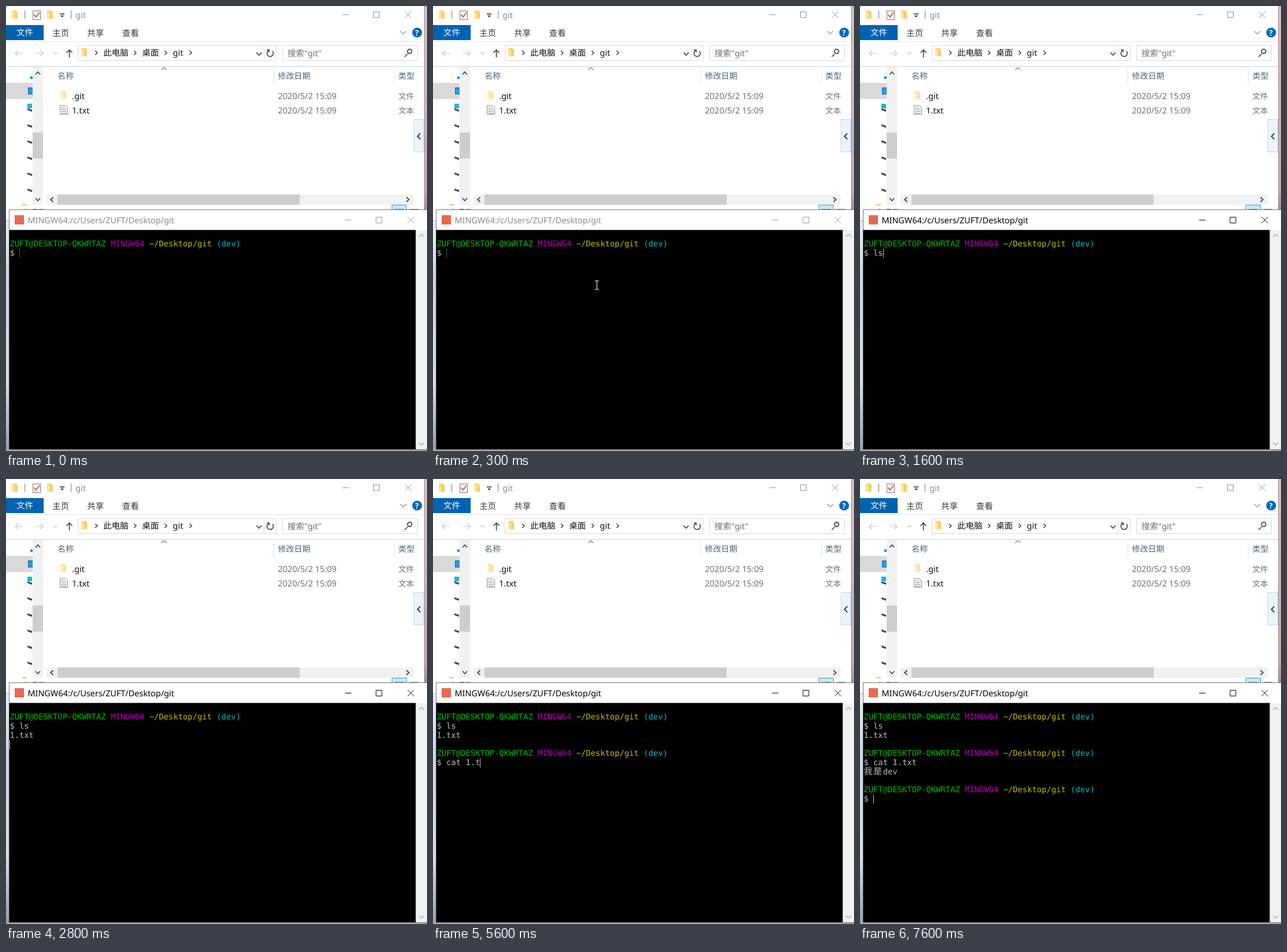
These frames come from a looping animation (727 by 770 pixels, 8000 ms). An HTML page:

```html
<!DOCTYPE html>
<html lang="zh">
<head>
<meta charset="utf-8">
<title>git</title>
<style>
  html, body { margin: 0; width: 100%; height: 100%; overflow: hidden; background: #fff; }
  svg { display: block; width: 727px; height: 770px; }
  text { font: 14.5px "Noto Sans", "Noto Sans CJK SC", sans-serif; text-rendering: geometricPrecision; white-space: pre; }
  rect { shape-rendering: crispEdges; }
  .line { fill: none; stroke: #222; stroke-width: 1.2; }
  .thick { stroke-width: 1.7; stroke: #444; }
  .pale { stroke: #c4c4c4; }
  .grey { stroke: #8a8a8a; }
  .head { font-size: 14px; fill: #4c607a; }
  .info { fill: #6d6d6d; }
  .box { fill: #fff; stroke: #d9d9d9; }
  #caption { font-size: 14.4px; fill: #888; }
  #controls { stroke: #999; }
  .active #caption { fill: #000; }
  .active #controls { stroke: #000; }
  #screen text { font: 13.8px "DejaVu Sans Mono", "Noto Sans CJK SC", monospace; fill: #bfbfbf; }
  #screen .wide { font-size: 15px; }
</style>
</head>
<body>
<svg viewBox="0 0 727 770">
  <defs>
    <linearGradient id="wall" x2="0" y2="1">
      <stop offset="0" stop-color="#d9bfc6"/><stop offset=".9" stop-color="#c9a9b2"/><stop offset="1" stop-color="#a98a94"/>
    </linearGradient>
    <linearGradient id="edge" x2="0" y2="1">
      <stop offset="0" stop-color="#e9eff4"/><stop offset=".25" stop-color="#c9d6e0"/>
      <stop offset=".7" stop-color="#d5e0e8"/><stop offset="1" stop-color="#8fa0ae"/>
    </linearGradient>
    <g id="folder"><path d="M0 0h8v2h2v12H0z" fill="#f6cf62"/><path d="M0 1l5 2v12l-5-2z" fill="#ffe394"/></g>
    <path id="up" class="line thick" d="M-4 2.5L0-2 4 2.5"/>
    <path id="right" class="line" d="M-2-3.5L1.8 0-2 3.5"/>
    <path id="buttons" d="M-5 0.5H6M48.5-4.5h10v10h-10zM103-5l11 11M114-5l-11 11" fill="none"/>
    <path id="drive" d="M0 0l8 2.5v3.5L0 3z" fill="#444"/>
  </defs>

  <!-- file explorer -->
  <rect width="727" height="770" fill="#fff"/>
  <rect x="722" width="1" height="353" fill="#9b8e93"/>
  <rect x="723" width="4" height="353" fill="url(#wall)"/>
  <use href="#folder" x="10" y="8"/>
  <path class="line grey" d="M32.5 8v14M112.5 8v14"/>
  <rect x="46.5" y="8.5" width="13" height="15" fill="#fff" stroke="#777"/>
  <path class="line" d="M48.5 15l3.5 4 6-8" style="stroke:#e0562b;stroke-width:2"/>
  <use href="#folder" x="71" y="8"/>
  <path d="M93 13h8v1.5h-8zM94 16.5h6l-3 3z" fill="#222"/>
  <text x="120" y="20.5" fill="#888">git</text>
  <use href="#buttons" x="586" y="14.5" stroke="#8a8a8a"/>

  <rect y="33" width="65" height="26" fill="#0063b1"/>
  <text x="18" y="51" fill="#fff">文件</text>
  <g fill="#333"><text x="80" y="51.5">主页</text><text x="140" y="51.5">共享</text><text x="200.5" y="51.5">查看</text></g>
  <path class="line grey" d="M681 43.5l5 5 5-5"/>
  <circle cx="710" cy="46" r="8.5" fill="#0067c0"/>
  <text x="706.5" y="51" fill="#fff" style="font-weight:bold;font-size:13px">?</text>
  <rect y="61" width="722" height="1" fill="#e4e4e4"/>

  <path class="line pale" d="M29 82H16m5-5l-5 5 5 5M51 82h13m-5-5l5 5-5 5M82 80l3.5 3.5L89 80"/>
  <path class="line thick" d="M109.5 89V76m-5 5l5-5 5 5"/>
  <rect class="box" x="124.5" y="68.5" width="342" height="26"/>
  <rect x="445" y="69" width="1" height="25" fill="#e0e0e0"/>
  <use href="#folder" x="130" y="73"/>
  <use href="#right" x="156" y="81"/><use href="#right" x="223" y="81"/>
  <use href="#right" x="276" y="81"/><use href="#right" x="319" y="81"/>
  <g fill="#111"><text x="168" y="86">此电脑</text><text x="235" y="86">桌面</text><text x="288" y="86">git</text></g>
  <path class="line thick" d="M432.5 80.5l4.5 4.5 4.5-4.5"/>
  <path class="line thick" d="M460 78a5.5 5.5 0 1 1-6-1.2M450.5 76h4v4"/>
  <rect class="box" x="477.5" y="68.5" width="233" height="26"/>
  <text x="486" y="87" class="info">搜索"git"</text>
  <path class="line thick" d="M688.5 88l5-5M693.5 80a3.8 3.8 0 1 1 7 0 3.8 3.8 0 0 1-7 0"/>
  <rect y="104" width="722" height="1" fill="#cfcfcf"/>

  <!-- navigation pane -->
  <circle cx="44" cy="124" r="2.5" fill="#1a8fe3"/>
  <rect y="133" width="46" height="28" fill="#d9d9d9"/>
  <rect x="38.5" y="141.5" width="8" height="11" fill="#1e9df0" stroke="#235a86"/>
  <rect x="37" y="169" width="8" height="8" fill="#20b2e8"/>
  <g id="drives"></g>
  <rect x="28" y="343" width="8" height="2" fill="#e6c65c"/>
  <rect x="46" y="105" width="18" height="239" fill="#f1f1f1"/>
  <rect x="46" y="219" width="18" height="45" fill="#cdcdcd"/>
  <use href="#up" x="55" y="116"/>
  <use href="#up" transform="translate(55 335) rotate(180)"/>

  <!-- file list -->
  <path class="line" d="M268 110.5l4.5-4 4.5 4" style="stroke:#777"/>
  <path class="line" d="M462.5 106v30M670.5 106v30" style="stroke:#e5e5e5"/>
  <text class="head" x="89" y="126">名称</text>
  <text class="head" x="469.5" y="126">修改日期</text>
  <text class="head" x="677.5" y="126">类型</text>
  <use href="#folder" x="94" y="147" opacity=".6"/>
  <path d="M93.5 172.5h9l4 3v12h-13z" fill="#fff" stroke="#888"/>
  <path class="line grey" d="M95.5 176.5h7m-7 3h9m-9 3h9m-9 3h9"/>
  <g fill="#111"><text x="114" y="161">.git</text><text x="114" y="186">1.txt</text></g>
  <g class="info">
    <text x="469.5" y="161">2020/5/2 15:09</text><text x="469.5" y="186">2020/5/2 15:09</text>
    <text x="677.5" y="161" style="font-size:13.6px">文件</text><text x="677.5" y="186" style="font-size:13.6px">文本</text>
  </g>
  <rect x="704.5" y="196.5" width="17" height="56" fill="#e9f5fb" stroke="#b5dcec"/>
  <path class="line" d="M715.5 220.5l-5 5 5 5" style="stroke:#111;stroke-width:1.6"/>
  <rect x="70" y="326" width="634" height="18" fill="#f1f1f1"/>
  <rect x="89" y="326" width="418" height="18" fill="#cdcdcd"/>
  <use href="#up" transform="translate(79 335) rotate(-90)"/>
  <use href="#up" transform="translate(694 335) rotate(90)"/>
  <text x="16" y="362" fill="#223a5c" style="font-size:13.5px">2 个项目</text>
  <rect x="666.5" y="344.5" width="25" height="20" fill="#cce8ff" stroke="#26a0da"/>
  <path class="line grey" d="M671 351.5h16M697 351.5h15"/>

  <!-- terminal window -->
  <rect y="371" width="5" height="399" fill="url(#edge)"/>
  <rect y="371" width="5" height="1" fill="#9aa4ab"/>
  <rect y="767" width="727" height="3" fill="#b5a5aa"/>
  <g id="terminal">
    <rect x="5" y="352" width="722" height="416" fill="#777"/>
    <rect x="6" y="353" width="721" height="35" fill="#fff"/>
    <rect x="15" y="362" width="16" height="16" fill="#e8694f"/>
    <text id="caption" x="37.5" y="376">MINGW64:/c/Users/ZUFT/Desktop/git</text>
    <use id="controls" href="#buttons" x="590.5" y="370"/>
    <rect x="707" y="388" width="20" height="379" fill="#f1f1f1"/>
    <path d="M5.5 387.5h702V767H5.5z"/>
    <path class="line" d="M713 399.5l4.5-4.5 4.5 4.5M713 755.5l4.5 4.5 4.5-4.5" style="stroke:#a9a9a9;stroke-width:1.5"/>
    <g id="screen"></g>
    <path id="caret" d="M.5 0v16" stroke="#bfbfbf" fill="none" shape-rendering="crispEdges"/>
    <path id="mouse" d="M-3.5-7.5H-1L0-6.5 1-7.5H3.5M-3.5 7.5H-1L0 6.5 1 7.5H3.5M0-6.5V6.5" stroke="#e8e8e8" stroke-width="1.2" fill="none"/>
  </g>
</svg>
<script>
const LOOP = 8000, FOCUS = 800, LEFT = 6.4, TOP = 404.25, CHAR_W = 8.31, ROW_H = 15.75;
const $ = id => document.getElementById(id);
const colX = col => LEFT + col * CHAR_W;
const rowY = row => TOP + row * ROW_H;

function add(parent, tag, attributes, content = '') {
  const node = document.createElementNS('http://www.w3.org/2000/svg', tag);
  for (const name in attributes) node.setAttribute(name, attributes[name]);
  node.textContent = content;
  parent.append(node);
  return node;
}

for (let i = 0; i < 6; i++) add($('drives'), 'use', { href: '#drive', x: 37, y: 177 + i * 27.8 });

const prints = [];   // text pieces and the time each appears
const carets = [];   // [time, row, col], no row while blinked off

function print(at, row, col, content, fill = '#bfbfbf', kind = '') {
  const node = add($('screen'), 'text', { x: colX(col), y: rowY(row) + 12, style: `fill:${fill}`, class: kind }, content);
  prints.push({ at, node });
}

function prompt(at, row) {
  print(at, row, 0, 'ZUFT@DESKTOP-QKWRTAZ', '#00bf00');
  print(at, row, 21, 'MINGW64', '#bf00bf');
  print(at, row, 29, '~/Desktop/git', '#bfbf00');
  print(at, row, 43, '(dev)', '#00bfbf');
  print(at, row + 1, 0, '$');
  carets.push([at, row + 1, 2]);
}

function type(row, content, times) {
  times.forEach((at, i) => {
    print(at, row, 2 + i, content[i]);
    carets.push([at, row, 3 + i]);
  });
}

prompt(0, 0);
type(1, 'ls', [1500, 1600]);
print(2800, 2, 0, '1.txt');
prompt(2900, 4);
type(5, 'cat 1.txt', [4000, 4100, 4400, 4500, 5200, 5400, 5600, 5800, 6000]);
print(6400, 6, 0, '我', undefined, 'wide');
print(6400, 6, 2, '是', undefined, 'wide');
print(6400, 6, 4, 'dev');
prompt(6700, 8);
carets.push([1300], [2100], [2600, 2, 0], [2800, 3, 0], [3400], [3900, 5, 2],
  [5000], [6300, 6, 0], [6400, 7, 0], [7100], [7600, 9, 2]);
carets.sort((a, b) => a[0] - b[0]);

const mousePath = [[200, 296, 512], [300, 283, 483], [500, 264, 465], [700, 253, 456]];

function mouseAt(t) {
  const i = mousePath.findIndex(point => point[0] > t);
  if (i < 0) return mousePath.at(-1).slice(1);
  const [t0, x0, y0] = mousePath[i - 1], [t1, x1, y1] = mousePath[i];
  const k = (t - t0) / (t1 - t0);
  return [x0 + (x1 - x0) * k, y0 + (y1 - y0) * k];
}

function show(node, visible) {
  node.style.display = visible ? '' : 'none';
}

function draw(now) {
  const t = now % LOOP;
  $('terminal').classList.toggle('active', t >= FOCUS);
  for (const { at, node } of prints) show(node, t >= at);

  const [, row, col] = carets.findLast(step => step[0] <= t);
  show($('caret'), row !== undefined);
  if (row !== undefined) {
    $('caret').setAttribute('transform', `translate(${Math.round(colX(col))} ${Math.round(rowY(row))})`);
  }
  $('caret').setAttribute('stroke-dasharray', t < FOCUS ? '1 1' : 'none');

  const mouseShown = t >= 200 && t < 1500;
  show($('mouse'), mouseShown);
  if (mouseShown) {
    const stepTime = Math.floor(t / 100) * 100;
    $('mouse').setAttribute('transform', `translate(${mouseAt(stepTime).map(Math.round)})`);
  }
}

const start = performance.now();
function tick() {
  draw(performance.now() - start);
  requestAnimationFrame(tick);
}
tick();
</script>
</body>
</html>
```
